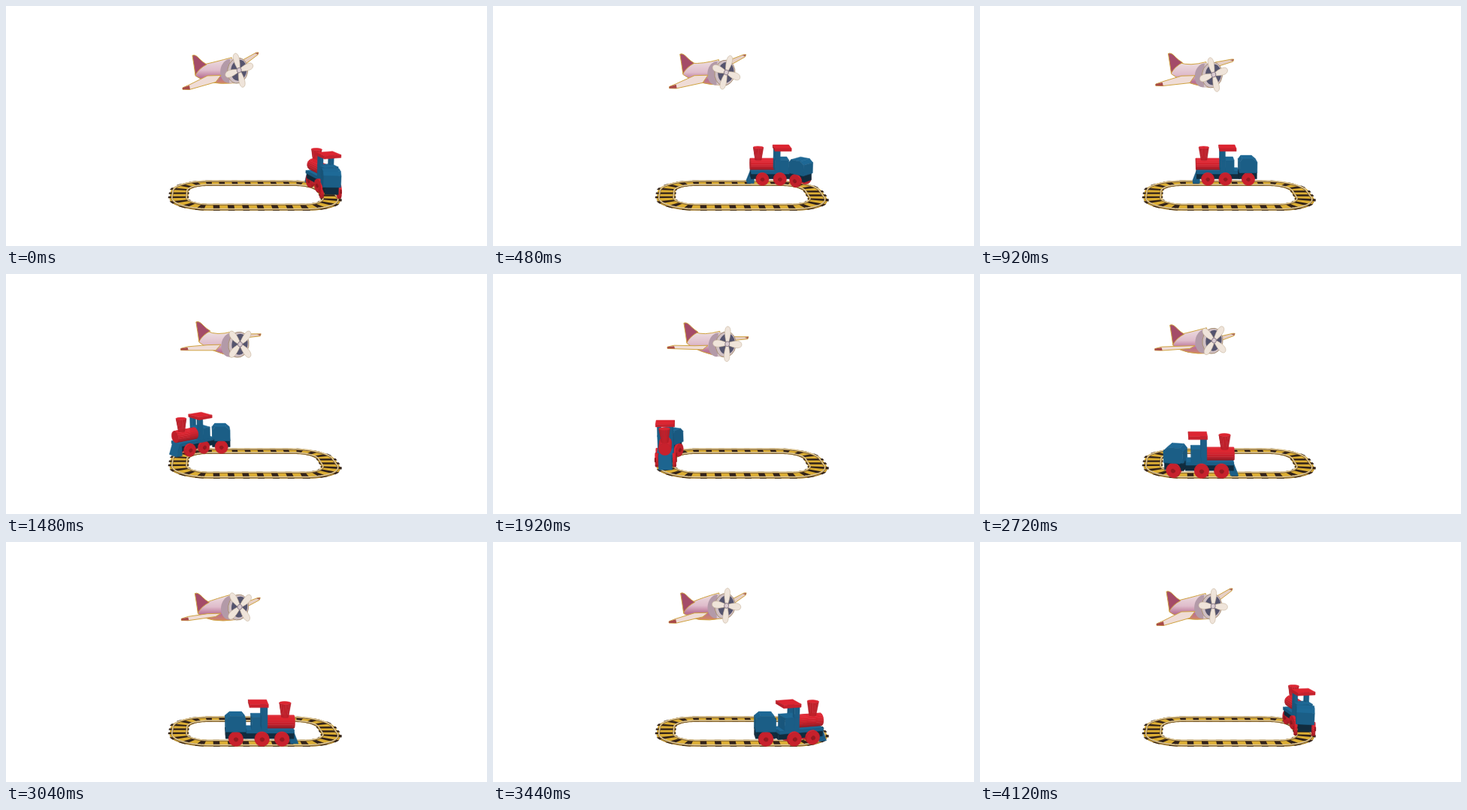
Recreate the animation shown at these times as an HTML page with a canvas. Size 640 by 320 pixels, loop 4160 ms.

```html
<!DOCTYPE html>
<html>
<head>
<meta charset="utf-8">
<title>Toy train and plane</title>
<style>
html, body { margin: 0; width: 100%; height: 100%; overflow: hidden; background: #fff; }
canvas { display: block; }
</style>
</head>
<body>
<canvas id="stage" width="640" height="320"></canvas>
<script>
const ctx = document.getElementById('stage').getContext('2d');
const LOOP = 4160, STEP = 40, TAU = Math.PI * 2;

// World axes: x right, y up, z towards the viewer, who stands a little to the left.
function project([x, y, z]) {
  const k = 1 / (1 - 0.00116 * (z + 0.3 * y));
  return [329.5 + (x + 0.08 * z) * k, 251 + (0.29 * z - 0.957 * y) * k];
}

function polygon(points, fill, stroke, width = 1) {
  ctx.beginPath();
  points.forEach(p => ctx.lineTo(...p));
  ctx.closePath();
  if (fill) { ctx.fillStyle = fill; ctx.fill(); }
  if (stroke) { ctx.strokeStyle = stroke; ctx.lineWidth = width; ctx.stroke(); }
}

// ---- Track: a rounded rectangle, measured from the middle of the front side ----
const RADIUS = 40, HALF_X = 59, HALF_Z = 15;
const QUARTER = RADIUS * Math.PI / 2;
const HALF_LAP = 2 * (HALF_X + HALF_Z + QUARTER), LAP = 2 * HALF_LAP;

function trackPoint(s, offset = 0) {
  s = ((s % LAP) + LAP) % LAP;
  const sign = s < HALF_LAP ? 1 : -1, r = RADIUS + offset;
  let x, z;
  s %= HALF_LAP;
  if (s < HALF_X) {
    [x, z] = [s, HALF_Z + r];
  } else if ((s -= HALF_X) < QUARTER) {
    [x, z] = [HALF_X + r * Math.sin(s / RADIUS), HALF_Z + r * Math.cos(s / RADIUS)];
  } else if ((s -= QUARTER) < 2 * HALF_Z) {
    [x, z] = [HALF_X + r, HALF_Z - s];
  } else if ((s -= 2 * HALF_Z) < QUARTER) {
    [x, z] = [HALF_X + r * Math.cos(s / RADIUS), -HALF_Z - r * Math.sin(s / RADIUS)];
  } else {
    [x, z] = [HALF_X - (s - QUARTER), -HALF_Z - r];
  }
  return [sign * x, 0, sign * z];
}

function loopPoints(offset, drop = 0) {
  return Array.from({ length: 160 }, (_, i) => {
    const [x, y] = project(trackPoint(i * LAP / 160, offset));
    return [x, y + drop];
  });
}

function band(inner, outer, fill, drop = 0) {
  ctx.beginPath();
  for (const offset of [inner, outer]) {
    loopPoints(offset, drop).forEach((p, i) => i ? ctx.lineTo(...p) : ctx.moveTo(...p));
    ctx.closePath();
  }
  ctx.fillStyle = fill;
  ctx.fill('evenodd');
}

function drawTrack() {
  band(-12, 12, '#a87f2c', 0.8);
  band(-12, 12, '#dcae34');
  const ties = 30;
  for (let i = 0; i < ties; i++) {
    const s = i * LAP / ties;
    const corners = [[s, -13], [s + 8, -13], [s + 8, 14], [s, 14]];
    polygon(corners.map(c => project(trackPoint(...c))), '#33231a');
  }
  for (const offset of [-10, 9]) {
    polygon(loopPoints(offset), null, '#7d5f30', 2.2);
    polygon(loopPoints(offset, -0.6), null, '#e0c894', 1.5);
  }
}

// ---- Train: convex prisms; local axes are forward, up, right ----
const BLUE = [29, 102, 146], NAVY = [18, 48, 68], RED = [216, 36, 48], CRIMSON = [162, 28, 36];
const SIZE = 0.94;

function prism(layer, color, axis, ring, from, to, endRing = ring) {
  const place = w => ([u, v]) => {
    const p = [];
    p[axis] = w;
    p[(axis + 1) % 3] = u;
    p[(axis + 2) % 3] = v;
    return p;
  };
  const a = ring.map(place(from)), b = endRing.map(place(to)), n = a.length;
  const sides = a.map((p, i) => [p, a[(i + 1) % n], b[(i + 1) % n], b[i]]);
  const all = [...a, ...b];
  const center = [0, 1, 2].map(i => all.reduce((sum, p) => sum + p[i], 0) / all.length);
  return { layer, color, center, faces: [...sides, b, [...a].reverse()] };
}

const box = (layer, color, x0, x1, y0, y1, z0, z1) =>
  prism(layer, color, 2, [[x0, y0], [x1, y0], [x1, y1], [x0, y1]], z0, z1);

const circle = (u, v, r, n = 18) => Array.from({ length: n }, (_, i) =>
  [u + r * Math.cos(i * TAU / n), v + r * Math.sin(i * TAU / n)]);

const axle = x => [
  prism(0, RED, 2, circle(x, 9.4, 9.4), 10, 14),
  prism(0, CRIMSON, 2, circle(x, 9.4, 2.6, 10), 14, 15),
  prism(0, RED, 2, circle(x, 9.4, 9.4), -14, -10),
  prism(0, CRIMSON, 2, circle(x, 9.4, 2.6, 10), -15, -14)
];

const engine = [
  box(0, NAVY, -34, 29, 9, 17, -9, 9),
  box(0, BLUE, -33, 29, 17, 21, -11, 11),
  box(0, NAVY, -40, -34, 11, 15, -3, 3),
  prism(0, BLUE, 2, [[25, 2], [35, 2], [28, 20], [25, 20]], -9, 9),
  ...axle(-13), ...axle(13),
  prism(1, RED, 0, circle(29.5, 0, 8.5), -6, 30),
  prism(1, RED, 1, circle(0, 18, 4.5, 14), 36, 55, circle(0, 18, 7.5, 14)),
  box(1, BLUE, -26, -13, 21, 38, -11, 11),
  box(1, BLUE, -13, -6, 21, 38, -11, 11),
  box(1, BLUE, -13, -6, 38, 52, -11, -6),
  box(1, BLUE, -13, -6, 38, 52, 6, 11),
  box(2, RED, -29, -5, 52, 56, -13, 13)
];

const tender = [
  box(0, NAVY, -13, 13, 9, 19, -9, 9),
  ...axle(0),
  prism(1, BLUE, 2, [[-13, 19], [13, 19], [13, 35], [9, 40], [-7, 40], [-13, 35]], -12, 12)
];

function shade(color, [a, b, c]) {
  const u = a.map((v, i) => b[i] - v), w = a.map((v, i) => c[i] - v);
  const n = [0, 1, 2].map(i =>
    u[(i + 1) % 3] * w[(i + 2) % 3] - u[(i + 2) % 3] * w[(i + 1) % 3]);
  const k = 0.82 + (0.2 * n[1] + 0.1 * n[2]) / Math.hypot(...n);
  return `rgb(${color.map(v => Math.round(v * k))})`;
}

function drawVehicle({ parts, front, back }) {
  const dx = front[0] - back[0], dz = front[2] - back[2], len = Math.hypot(dx, dz);
  const fx = SIZE * dx / len, fz = SIZE * dz / len;
  const ox = (front[0] + back[0]) / 2, oz = (front[2] + back[2]) / 2;
  const toWorld = ([x, y, z]) => [ox + x * fx - z * fz, SIZE * y, oz + x * fz + z * fx];
  const near = part => {
    const [, y, z] = toWorld(part.center);
    return z + 0.3 * y;
  };
  const order = [...parts].sort((p, q) => p.layer - q.layer || near(p) - near(q));
  for (const { color, faces } of order) {
    for (const face of faces) {
      const world = face.map(toWorld), flat = world.map(project);
      const [a, b, c] = flat;
      const area = (b[0] - a[0]) * (c[1] - a[1]) - (b[1] - a[1]) * (c[0] - a[0]);
      if (area >= 0) continue;
      const fill = shade(color, world);
      polygon(flat, fill, fill, 0.5);
    }
  }
}

function drawTrain(t) {
  const s = 4 + (t - 3040) * LAP / LOOP;
  const vehicle = (parts, offset, reach) => ({
    parts,
    front: trackPoint(s + SIZE * (offset + reach)),
    back: trackPoint(s + SIZE * (offset - reach))
  });
  [vehicle(engine, 14, 13), vehicle(tender, -33, 8)]
    .sort((p, q) => p.front[2] + p.back[2] - q.front[2] - q.back[2])
    .forEach(drawVehicle);
}

// ---- Plane ----
const SPIN = [[0, -17], [920, -466], [1480, -765], [2360, -1210], [3040, -1570],
  [3440, -1795], [4120, -2157], [4160, -2177]];

function spinAngle(t) {
  const i = SPIN.findIndex(key => key[0] > t);
  const [t0, a0] = SPIN[i - 1], [t1, a1] = SPIN[i];
  return (a0 + (a1 - a0) * (t - t0) / (t1 - t0)) * Math.PI / 180;
}

function ellipse(x, y, rx, ry, fill, stroke) {
  ctx.beginPath();
  ctx.ellipse(x, y, rx, ry, 0.15, 0, TAU);
  ctx.fillStyle = fill;
  ctx.fill();
  if (stroke) { ctx.strokeStyle = stroke; ctx.lineWidth = 1; ctx.stroke(); }
}

function drawPropeller(x, y, angle) {
  ctx.save();
  ctx.translate(x, y);
  ctx.scale(0.82, 1);
  ctx.rotate(angle);
  for (let i = 0; i < 4; i++) {
    ctx.beginPath();
    ctx.moveTo(-1.2, 0);
    ctx.bezierCurveTo(-6, -13, -6, -23, 0, -23.5);
    ctx.bezierCurveTo(6, -23, 6, -13, 1.2, 0);
    ctx.fillStyle = '#efe4da';
    ctx.fill();
    ctx.strokeStyle = '#c4b198';
    ctx.lineWidth = 0.6;
    ctx.stroke();
    ctx.rotate(TAU / 4);
  }
  ctx.restore();
  ellipse(x, y, 3, 3.4, '#d9cbd0', '#8c7c88');
}

function drawPlane(t) {
  const c = Math.cos(t / LOOP * TAU), s = Math.sin(t / LOOP * TAU);
  const edge = '#cfa240';
  const nx = 311 - 0.8 * c, ny = 89.2 - 3.5 * c + 3 * s;
  const lx = 233.5 + 1.5 * c, ly = 104 + 6 * c;
  const rx = 338 - 2 * c, ry = 73 - 11 * c;
  const tx = 251 - 3 * c, ty = 66 - 2.6 * s;

  // Far wing
  const rootY = 79 - 5.5 * c - 3 * s;
  polygon([[nx + 2, rootY], [rx - 3, ry], [rx, ry], [rx - 1, ry + 3], [nx + 7, rootY + 5]],
    '#e6cfc4', edge);
  polygon([[rx - 5, ry + 1], [rx, ry], [rx - 1, ry + 2.5]], '#a45a52');

  // Body
  const body = ctx.createLinearGradient(0, ny - 15, 0, ny + 18);
  body.addColorStop(0, '#ecdcdf');
  body.addColorStop(0.45, '#dfbccb');
  body.addColorStop(0.75, '#b87094');
  body.addColorStop(1, '#d48a62');
  ctx.beginPath();
  ctx.moveTo(tx + 4, ty + 18);
  ctx.lineTo(tx + 15, ty + 12);
  ctx.quadraticCurveTo(nx - 32, ny - 11, nx - 10, ny - 17);
  ctx.lineTo(nx - 6, ny + 17);
  ctx.quadraticCurveTo(tx + 20, ty + 40, tx + 4, ty + 27);
  ctx.closePath();
  ctx.fillStyle = body;
  ctx.fill();
  ctx.strokeStyle = edge;
  ctx.lineWidth = 1;
  ctx.stroke();

  // Tail fin
  ctx.beginPath();
  ctx.moveTo(tx, ty);
  ctx.quadraticCurveTo(tx + 4, ty - 2, tx + 10, ty + 5);
  ctx.quadraticCurveTo(tx + 14, ty + 9, tx + 19, ty + 12);
  ctx.quadraticCurveTo(tx + 9, ty + 17, tx + 4, ty + 26);
  ctx.quadraticCurveTo(tx + 2, ty + 12, tx, ty);
  ctx.fillStyle = '#a44b68';
  ctx.fill();
  ctx.stroke();

  // Engine cowling
  ellipse(nx - 13, ny + 1, 12, 16, '#b39aa8');
  polygon([[nx - 12, ny - 15], [nx - 1, ny - 16], [nx - 2, ny + 17], [nx - 13, ny + 17]], '#d6c4c8');
  ellipse(nx - 2, ny + 0.5, 13.5, 17, '#cfbfc3', '#a88f72');
  ellipse(nx - 0.5, ny, 10.5, 14, '#55546e');

  // Near wing
  const thick = 6.5 + 2 * c + 2.5 * s, wy = 94.5 - 1.5 * c - s;
  polygon([[lx, ly - 1], [lx + 9, ly - 4 - c], [268, wy], [286, wy - 0.5],
    [279, wy + thick], [lx + 9, ly + 1.5], [lx, ly + 1.2]], '#efdcd6', edge);
  polygon([[lx, ly - 1], [lx + 9, ly - 3 - c], [lx + 10, ly + 1.3], [lx, ly + 1.2]], '#a84a48');

  drawPropeller(nx, ny, spinAngle(t));
}

const start = performance.now();

function frame(now) {
  const t = Math.floor(Math.max(0, now - start) % LOOP / STEP) * STEP;
  ctx.fillStyle = '#fff';
  ctx.fillRect(0, 0, 640, 320);
  drawTrack();
  drawTrain(t);
  drawPlane(t);
  requestAnimationFrame(frame);
}
frame(start);
</script>
</body>
</html>
```
